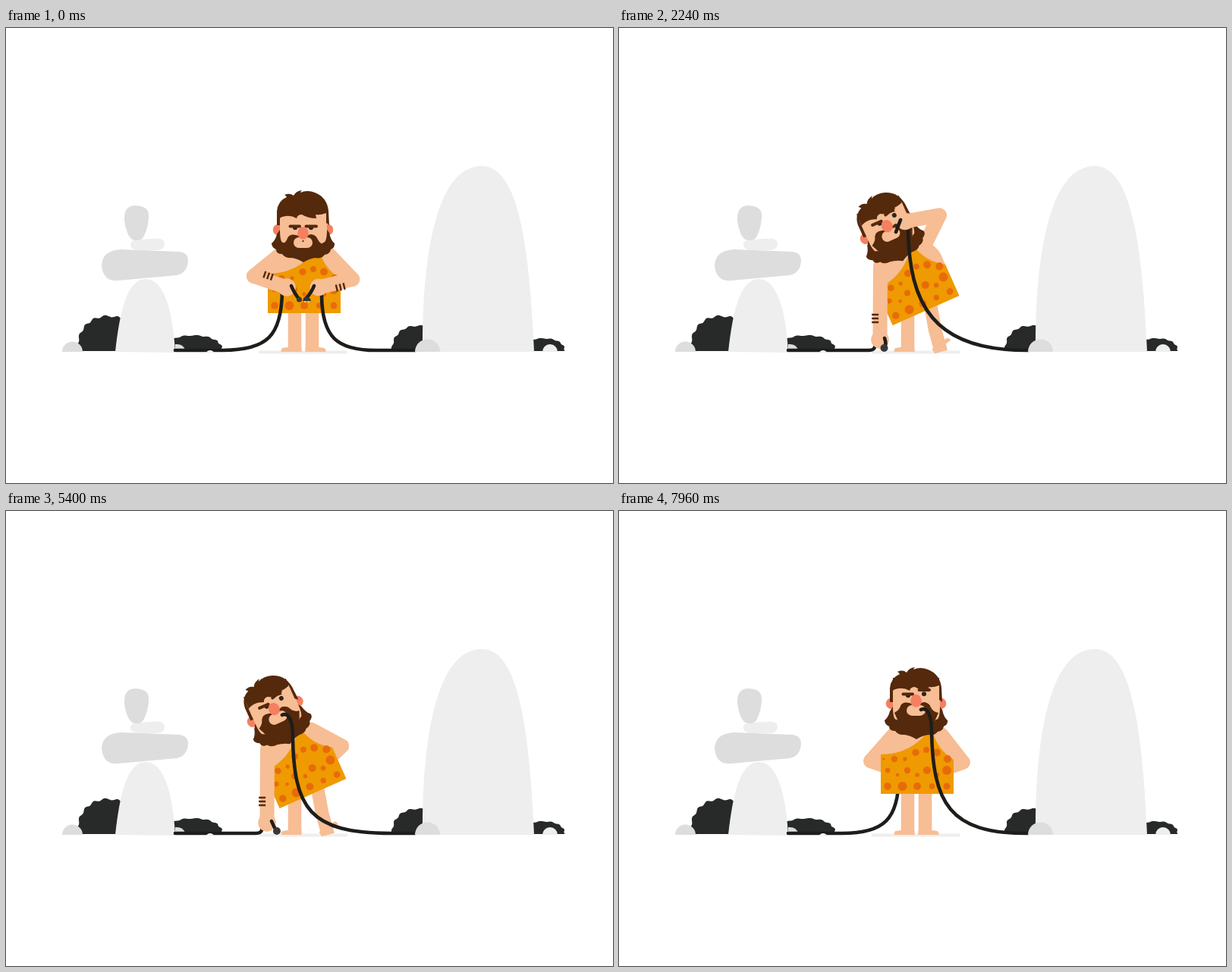
Animation, 800 px wide and 600 px high, one loop 8000 ms. Source, as an HTML page:

```html
<!DOCTYPE html>
<html lang="en">
<head>
<meta charset="utf-8">
<title>Caveman and cable</title>
<style>
html,body{margin:0;width:100%;height:100%;overflow:hidden;background:#fff}
svg{display:block;width:100vw;height:100vh}
</style>
</head>
<body>
<svg viewBox="0 0 800 600">
  <g id="bushes" fill="#272a29"></g>
  <g fill="#eee">
    <path d="M144 427C150 372 160 331 184 331S220 372 223 428Z"/>
    <path d="M164 286Q164 279 174 279L200 277.5Q210 278 209 286Q207 293 199 293H176Q164 293 164 286Z"/>
    <path d="M549 427C548 330 560 182 627 182C678 182 690 300 696 427Z"/>
    <path d="M707 427a10 10 0 0 1 20 0Z"/>
    <rect x="333" y="425.5" width="117" height="4" rx="2"/>
  </g>
  <g fill="#ddd">
    <path d="M74 427a13.5 13.5 0 0 1 27 0Z"/>
    <path d="M126 313Q127 293 152 292L228 295Q240 296 240 307Q239 323 225 326L148 333Q128 335 126 313Z"/>
    <path d="M157 243Q160 234 171 234Q188 235 188 247Q188 262 182 274Q179 280 173 280Q164 281 160 270Q154 255 157 243Z"/>
    <path d="M223 417Q234 416 236 425H223Z"/>
  </g>
  <g id="man"></g>
  <path d="M539 427a16.5 16.5 0 0 1 33 0Z" fill="#ddd"/>
  <path d="M264 429a5 4 0 0 1 10 0Z" fill="#f4f4f4"/>
</svg>
<script>
const LOOP = 8000, GROUND = 425, BONE = 46;
const SKIN = '#f7bd94', HAIR = '#54290c', INK = '#1f1d1a', PINK = '#f58060';
const man = document.getElementById('man');

// eased 0 to 1 between two times
function ramp(t, from, to) {
  const u = Math.min(1, Math.max(0, (t - from) / (to - from)));
  return u < .5 ? 4 * u ** 3 : 1 - (2 - 2 * u) ** 3 / 2;
}
const mix = (a, b, k) => a.map((v, i) => v + (b[i] - v) * k);
const shift = ([x, y], dx, dy) => [x + dx, y + dy];

const line = (d, color, w, cap = 'round') =>
  `<path d="${d}" fill="none" stroke="${color}" stroke-width="${w}" stroke-linecap="${cap}" stroke-linejoin="round"/>`;
const fill = (d, color) => `<path d="${d}" fill="${color}"/>`;
const dot = (x, y, r, color, ry = r) => `<ellipse cx="${x}" cy="${y}" rx="${r}" ry="${ry}" fill="${color}"/>`;
const group = (tf, s) => `<g transform="${tf}">${s}</g>`;
const limb = (a, b) => line(`M${a}L${b}`, SKIN, 19);

// half ellipse with a wavy edge
function bush(cx, rx, ry, waves) {
  let d = '';
  for (let i = 0; i <= 80; i++) {
    const a = Math.PI * i / 80, r = .98 + .028 * Math.sin(a * waves * 2);
    const x = cx - rx * r * Math.sign(Math.cos(a)) * Math.abs(Math.cos(a)) ** .9;
    d += `${i ? 'L' : 'M'}${x.toFixed(1)} ${(426 - ry * r * Math.sin(a) ** .9).toFixed(1)}`;
  }
  return `<path d="${d}Z"/>`;
}
document.getElementById('bushes').innerHTML =
  bush(135, 42, 47, 9) + bush(247, 39, 21, 8) + bush(543, 35, 34, 8) + bush(708, 29, 17, 7);

function spots() {
  let s = '';
  for (let i = 0; i < 7; i++) {
    const odd = i % 2;
    s += dot(349 + 14 * i, 327 - 12 * Math.max(0, Math.sin((i - 2) * Math.PI / 4)), odd ? 4 + .2 * i : 1.5 + .6 * i, '#e86b0a');
    s += dot(354 + 13 * i, 342 + 6 * odd, odd ? 2 + .25 * i : 3.3 + .45 * i, '#e86b0a');
    if (i < 5) s += dot(354 + 19.5 * i, 363, 4.8 + 1.2 * Math.sin(1.5 * i), '#e86b0a');
  }
  return s;
}
const tunic = fill('M345 373V321Q384 321 408 290H413Q419 314 441 328V373Z', '#ef9a00') + spots();
const torso = fill('M357 290Q345 302 345 321V373H441V324Q443 306 434 294L420 283H365Z', SKIN);
const foot = fill('M-9 0V-6H9L16 -5Q18 -4 18 0Z', SKIN);

// elbow of a two-bone arm; bend is its side and amount
function elbow([sx, sy], [hx, hy], bend) {
  const dx = hx - sx, dy = hy - sy, d = Math.hypot(dx, dy);
  const h = bend * Math.sqrt(Math.max(0, BONE ** 2 - d * d / 4)) / d;
  return [(sx + hx) / 2 - dy * h, (sy + hy) / 2 + dx * h];
}

// cable lying on the ground from x0, then rising to a point; dir faces the anchor
function cable(x0, [ex, ey], dir) {
  const h = GROUND - ey, dist = Math.abs(x0 - ex);
  const taut = Math.max(0, h - 125), slack = Math.max(0, 110 - dist);
  const bendX = ex + dir * Math.min(dist - 4, h);
  const c1 = ex + dir * (Math.min(20, .3 * h) + .35 * taut - 1.2 * slack);
  const c2 = ex + dir * (.01 * h - .2 * slack);
  return `M${x0} ${GROUND}H${bendX}C${c1} ${GROUND} ${c2} ${ey + h * (.76 - .0045 * taut)} ${ex} ${ey}`;
}

function bands([ex, ey], [hx, hy], side) {
  if (Math.abs(side) < .05) return '';
  const n = Math.hypot(hx - ex, hy - ey), x = (hx - ex) / n, y = (hy - ey) / n;
  return [23, 28, 33].map(d => {
    const at = k => `${hx - x * d - y * k * side} ${hy - y * d + x * k * side}`;
    return line(`M${at(2)}L${at(11)}`, HAIR, 2.4, 'butt');
  }).join('');
}

function cord(hand, side, plug) {
  return line(`M${shift(hand, 6 * side, -2)}Q${shift(hand, 9 * side, 6)} ${plug}`, INK, 4.6);
}

function legs(t, lean, dip) {
  const x = 403.5, tap = t > 1980 && t < 5620 ? -19 * (1 + Math.cos((t - 2240) / 260 * Math.PI)) : 0;
  const hip = [x + 7 * lean + 13 * dip, 365 + 10 * dip];
  const knee = [x + 13 * lean + 16 * dip, 398 - 4 * dip];
  const ankle = [x + 21 * lean - 3 * dip, 427 - 2 * dip];
  return line('M380.500 365V427', SKIN, 17.5, 'butt') + group('translate(380.500 427)scale(-1 1)', foot) +
    line(`M${hip}L${knee}L${ankle}`, SKIN, 17.5, 'butt') +
    group(`translate(${ankle})rotate(${tap} -7 0)`, foot);
}

const beard = fill('M361 266Q361 284 366 283L372 288H412L418 283Q423 283 423 266L426 270Q428 280 433 284Q434 289 428 292' +
  'Q427 298 420 299Q415 305 408 303Q400 304 392 309Q384 304 376 303Q368 304 364 298Q356 298 356 292Q350 289 350 284Q355 280 357 272Z', HAIR);
const hair = fill('M357 260V242Q358 228 370 223Q368 220 367 220Q374 217 379 221Q382 215 390 214Q388 216 388 217' +
  'Q397 213 407 217Q423 223 425 241L426 260L422 257V236H361V260Z', HAIR);
const fringe = fill('M361 234V251Q362 249 369 248Q376 247 383 251Q384 246 390 246Q398 251 409 251L408 246Q414 247 422 244V234Z', HAIR);
const moustache = fill('M363 286Q370 282 371 277Q374 271 382 273Q388 274 391 277Q396 273 402 272Q409 273 411 279Q414 285 421 286L414 302H370Z', HAIR);

// look lifts the face from bowed to level
function head(t, look, lean, raise) {
  const talking = t > 800 && t < 1650;
  const breath = -.5 * ramp(t, 6500, 6900) * Math.sin((t - 6500) / 500);
  const lift = (k, s) => group(`translate(0 ${-k * look})`, s);
  const face =
    dot(381 + 3 * lean, 263.3, 3, '#2b2522') + dot(402 + 4 * lean, 263.3 - 2 * raise, 3, '#2b2522') +
    line('M374.500 261.500H387', HAIR, 4) +
    group(`translate(0 ${-5.5 * raise})rotate(${-15 * lean} 396 261)`, line('M395.500 261.500H409', HAIR, 4)) +
    moustache + `<rect x="379" y="276" width="25" height="14" rx="7" fill="${SKIN}"/>` +
    (talking ? line('M374 279Q378 270 387 275', HAIR, 4) + dot(381, 278, 4.8, '#f00', 2.8) : '') +
    (look < .5 ? dot(391.5, 281, 1.1, INK) : '') +
    dot(391.5, 270.5, 7.3, PINK, 8.3);
  return group(`translate(0 ${-3 - 5 * look + breath})`,
    lift(4, dot(359, 266, 7.3, PINK) + dot(424, 266, 7.3, PINK)) +
    fill('M361 236H423V292H361Z', SKIN) + beard + hair + lift(6, fringe) + lift(12, face));
}

function draw(t) {
  const start = ramp(t, 100, 700), bite = ramp(t, 1560, 1840), release = ramp(t, 3900, 4300);
  const show = ramp(t, 3000, 3400) - ramp(t, 3980, 4360);
  const rise = ramp(t, 5880, 6440), dip = Math.sin(Math.PI * rise);
  const lean = start - ramp(t, 5880, 6300);

  const dx = 11.5 * lean, dy = 3 * (1 - start) - .5 * lean + 7 * dip, rot = -24 * lean;
  const c = Math.cos(rot * Math.PI / 180), s = Math.sin(rot * Math.PI / 180);
  const place = (x, y) => [393 + dx + (x - 393) * c - (y - 373) * s, 373 + dy + (x - 393) * s + (y - 373) * c];
  const body = str => group(`translate(${dx} ${dy})rotate(${rot} 393 373)`, str);

  // left: clasp, ground, raised sign, behind the back
  let lh = mix([370, 342], [344, 411], start);
  lh = mix(mix(lh, [292, 328], show), place(375, 345), rise);
  const ls = place(362, 295), le = elbow(ls, lh, 1 - 2 * show);
  const swing = -5.5 * Math.sin((t - 1100) / 2280 * Math.PI);
  const lp = shift(lh, 11 + swing, 11 + 5 * (1 - start) + 6 * show);
  const plug = group(`translate(${lp})`, show > .5 ? fill('M-3 -3L7 -1L0 6Z', '#302e2d') : dot(0, 0, 3.5 + 1.5 * start, '#3a3836'));
  const fingers = show > .02
    ? line(`M${shift(lh, -1, -4)}l${-2 * show} ${-17 * show}M${shift(lh, 4, -4)}l${8 * show} ${-15 * show}`, SKIN, 6.5) : '';
  const leftArm = line(cable(223, shift(lh, -6, 5), -1), INK, 4.6) + limb(ls, le) + limb(le, lh) +
    bands(le, lh, (2 * start - 1) * (1 - .65 * show) * (1 - rise ** 3)) +
    fingers + dot(...lh, 11.8, SKIN) + cord(lh, 1, lp) + plug;

  // right: clasp, overhead, mouth, behind the back
  let rh = mix(mix([412, 342], [377, 203], start), [377, 255], bite);
  rh = shift(mix(rh, place(410, 347), release), 0, -88 * Math.sin(Math.PI * release));
  const rs = place(425, 295), re = elbow(rs, rh, 2 * start - 1 - 2 * release);
  const rp = shift(rh, -16 + 10 * start - 6 * bite, 14);
  const upper = limb(rs, re), fore = limb(re, rh) + bands(re, rh, start - 1), fist = dot(...rh, 11.3, SKIN);
  const prongs = bite < .8 ? group(`translate(${rp})`,
    line('M-2 3V6M3 3V6', '#f3d41c', 2, 'butt') + fill('M-5 4Q-4 -2 0 -2Q5 -1 6 4Z', '#35303a')) : '';

  // once let go, the cable hangs from the mouth
  const free = release > .01, mouth = place(398, 262);
  const end = mix(shift(rh, 4, 11), shift(mouth, 14, 27), free ? 1 : 0);
  const hook = free ? `C${shift(end, 0, -20)} ${shift(mouth, 8, -4)} ${mouth}` : '';
  const rightCable = line(cable(540, end, 1) + hook, INK, 4.6);

  const leftBehind = rise > .02, rightBehind = release > .75;
  man.innerHTML = legs(t, lean, dip) + body(torso) +
    (leftBehind ? leftArm : '') +
    (rightBehind ? upper + fore + fist : '') +
    body(tunic) +
    (rightBehind ? '' : upper) +
    (leftBehind ? '' : leftArm) +
    body(head(t, start, lean, start * (1 - dip))) +
    (rightBehind ? '' : fore) + rightCable +
    (rightBehind ? '' : fist) + (free ? '' : cord(rh, -1, rp) + prongs);
}

const begin = performance.now();
function tick() {
  draw((performance.now() - begin) % LOOP);
  requestAnimationFrame(tick);
}
draw(0);
requestAnimationFrame(tick);
</script>
</body>
</html>
```
